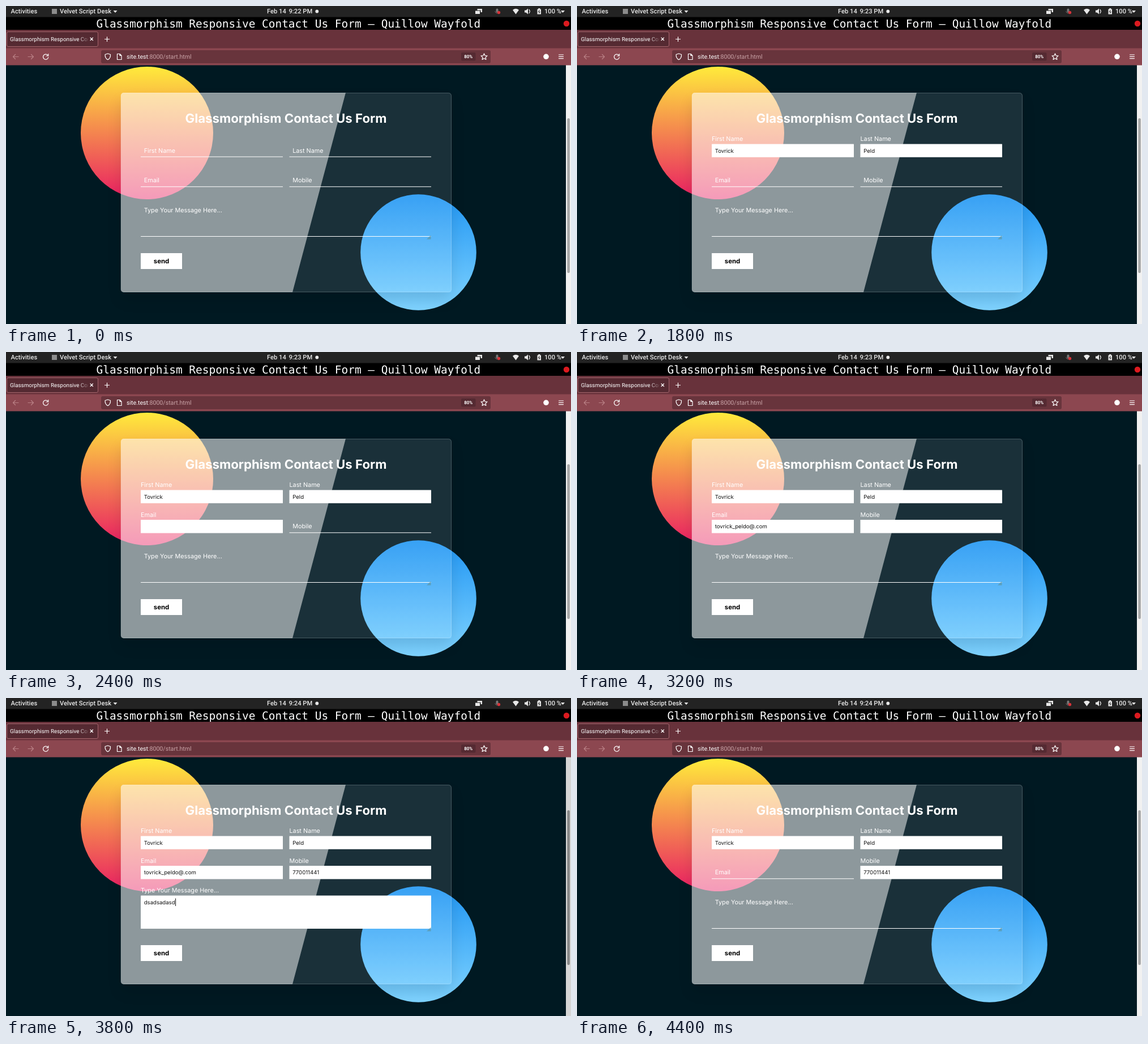
Recreate the animation shown at these times as an HTML page. Size 998 by 561 pixels, loop 4.6 s.

```html
<!DOCTYPE html>
<html lang="en">
<head>
<meta charset="utf-8">
<title>Glassmorphism Contact Us Form</title>
<style>
  html, body { margin: 0; width: 100%; height: 100%; overflow: hidden; background: #001922; }
  svg { display: block; width: 100%; height: 100%; }
  text { fill: #fff; white-space: pre; text-rendering: geometricPrecision; }
  .bar text { font: 500 11.2px Roboto, "Noto Sans", sans-serif; fill: #e9e9e9; }
  .caption { font: 19.45px "DejaVu Sans Mono", monospace; }
  .browser text { font: 10.6px Roboto, "Noto Sans", sans-serif; }
  .browser .tab { font-size: 9.9px; }
  .browser .zoom { font-size: 8px; font-weight: 700; }
  .form text { font: 10.8px Inter, "Open Sans", sans-serif; }
  .form .heading { font-size: 22.2px; font-weight: 700; }
  .form .send { font-size: 11.4px; font-weight: 700; fill: #000; }
  .form .value { font-size: 9.6px; fill: #111; }
  .line { fill: none; stroke: #fff; stroke-width: 1.2; stroke-linecap: round; stroke-linejoin: round; }
  .dim { stroke: #b98085; }
</style>
</head>
<body>
<svg viewBox="0 0 998 561" preserveAspectRatio="none">
  <defs>
    <linearGradient id="sunset" x2="0" y2="1">
      <stop stop-color="#ffeb3b"/><stop offset="1" stop-color="#e91e63"/>
    </linearGradient>
    <linearGradient id="sky" x2="0" y2="1">
      <stop stop-color="#2196f3"/><stop offset="1" stop-color="#7fd3ff"/>
    </linearGradient>
    <linearGradient id="fade" gradientUnits="userSpaceOnUse" x1="128" x2="145" y1="0" y2="0">
      <stop stop-color="#fff"/><stop offset="1" stop-color="#fff" stop-opacity=".15"/>
    </linearGradient>
    <clipPath id="tabClip"><path d="M7 45H145V72H7z"/></clipPath>
    <clipPath id="cardClip"><rect x="203" y="153" width="584" height="352" rx="5"/></clipPath>
    <clipPath id="outside"><path clip-rule="evenodd" d="M0 104H989V561H0zM203 153V505H787V153z"/></clipPath>
    <filter id="soft" x="-20%" y="-20%" width="140%" height="140%"><feGaussianBlur stdDeviation="13"/></filter>
  </defs>

  <!-- page -->
  <rect width="998" height="561" fill="#001922"/>
  <circle cx="249" cy="224" r="117" fill="url(#sunset)"/>
  <circle cx="728.5" cy="434.5" r="102.3" fill="url(#sky)"/>
  <g clip-path="url(#outside)">
    <rect x="203" y="167" width="584" height="352" rx="5" opacity=".1" filter="url(#soft)"/>
  </g>
  <g clip-path="url(#cardClip)" fill="#fff">
    <path d="M203 153H787V505H203z" opacity=".1"/>
    <path d="M203 153H600L506 505H203z" opacity=".5"/>
  </g>
  <rect x="203" y="153.5" width="583.5" height="351" rx="5" fill="none" stroke="#fff" stroke-opacity=".2"/>

  <g class="form">
    <text class="heading" x="494.5" y="206" text-anchor="middle">Glassmorphism Contact Us Form</text>
    <g id="fields"></g>
    <path d="M750.5 404.5V411.5H743z" fill="#5b9aae" opacity=".8"/>
    <rect x="238" y="436" width="73" height="28" fill="#fff"/>
    <text class="send" x="274.5" y="454" text-anchor="middle">send</text>
  </g>

  <rect id="track" x="989" y="104" width="9" height="457"/>
  <rect id="thumb" x="991.3" y="198" width="4.6" height="273" rx="2.3"/>

  <!-- desktop bar -->
  <g class="bar">
    <rect width="998" height="20" fill="#232323"/>
    <text x="8.5" y="13">Activities</text>
    <rect x="81" y="5" width="9" height="9" fill="#8c8c8c"/>
    <text x="95" y="13">Velvet Script Desk</text>
    <text x="461" y="13">Feb 14</text>
    <text id="clock" x="499.5" y="13"></text>
    <text x="951" y="13">100 %</text>
    <g fill="#e9e9e9">
      <path d="M189.5 8H196.5L193 12zM980 8H987L983.500 12z"/>
      <circle cx="549.3" cy="9.500" r="2.9"/>
      <path d="M832.500 5H841V11H838.500V7.500H832.500zM829 8.500H837V14H829z"/>
      <path d="M895 7Q900.500 2.500 906 7L900.500 14.500z"/>
      <path d="M916 7.500H918.500L922 4.500V14.500L918.500 11.500H916z"/>
      <path d="M938.500 5.500H940.300V4H943.300V5.500H945V14.500H938.500z"/>
    </g>
    <path d="M924 6.500Q926.500 9.500 924 12.500" class="line"/>
    <path d="M942.500 7L940.300 10.300H943.300L941.300 13" fill="none" stroke="#232323"/>
    <rect x="865.500" y="4.500" width="4" height="7" rx="2" fill="#777"/>
    <path d="M863.500 9.500Q867.500 16 871.500 9.500" fill="none" stroke="#777"/>
    <circle cx="870.500" cy="11.500" r="2.7" fill="#d8333a"/>
  </g>

  <!-- window -->
  <rect y="19.500" width="998" height="23" />
  <text class="caption" x="159.500" y="38">Glassmorphism Responsive Contact Us Form — Quillow Wayfold</text>
  <circle cx="990" cy="31" r="5.2" fill="#db1a1f"/>
  <g class="browser">
    <rect y="42" width="998" height="33" fill="#68323b"/>
    <rect y="74.500" width="998" height="30" fill="#8c4750"/>
    <rect x="1.500" y="45.500" width="161" height="26" rx="2.500" fill="#552a32" stroke="#a5666d"/>
    <text class="tab" x="7" y="62" clip-path="url(#tabClip)" style="fill:url(#fade)">Glassmorphism Responsive Contact</text>
    <rect x="168" y="78" width="688" height="23" rx="3" fill="#68343c"/>
    <rect x="804" y="82" width="25.500" height="14.500" rx="2" fill="#552a32"/>
    <text x="213" y="93">site.test<tspan fill="#c9a3a7">:8000/start.html</tspan></text>
    <text class="zoom" x="816.700" y="92.300" text-anchor="middle">80%</text>
    <path class="line" d="M149 56L153.500 60.500M153.500 56L149 60.500M174.500 58.500H182.500M178.500 54.500V62.500"/>
    <path class="line dim" d="M22 89.500H12.500M16.500 85.500L12.500 89.500L16.500 93.500M39 89.500H48.500M44.500 85.500L48.500 89.500L44.500 93.500"/>
    <path class="line" d="M73.500 86.500A4.600 4.600 0 1 0 74.700 90.500M74.700 84.500V88H71.200"/>
    <path class="line" d="M179.800 84L184.500 85.500Q185 92 179.800 94.800Q174.600 92 175.100 85.500z"/>
    <path class="line" d="M196.500 84.500H201L204 87.500V94.500H196.500zM201 84.500V87.500H204"/>
    <path class="line" id="star"/>
    <circle cx="954" cy="89.300" r="4.800" fill="#fff"/>
    <path class="line" d="M976.500 86H984.500M976.500 89.300H984.500M976.500 92.600H984.500"/>
  </g>
</svg>
<script>
const LOOP = 4600;
const FIELDS = {
  first:   { x: 238,   y: 243.5, w: 251, h: 23,   label: 'First Name' },
  last:    { x: 500.5, y: 243.5, w: 250.5, h: 23, label: 'Last Name' },
  email:   { x: 238,   y: 296,   w: 251, h: 23.3, label: 'Email' },
  mobile:  { x: 500.5, y: 296,   w: 250.5, h: 23.3, label: 'Mobile' },
  message: { x: 238,   y: 348.5, w: 513, h: 58.5, label: 'Type Your Message Here...' }
};

// A field holding null shows its placeholder; any string shows the filled box.
const STEPS = [
  [0,    { first: null, last: null, email: null, mobile: null, message: null, caret: '', clock: '9:22 PM', hover: false }],
  [200,  { first: '' }],
  [400,  { first: 'T' }],
  [600,  { first: 'To' }],
  [800,  { first: 'Tov' }],
  [1000, { first: 'Tovr', caret: 'first' }],
  [1200, { first: 'Tovrick', caret: '' }],
  [1400, { last: '' }],
  [1600, { last: 'Pe', clock: '9:23 PM' }],
  [1800, { last: 'Peld' }],
  [2200, { email: '', caret: 'email' }],
  [2400, { caret: '' }],
  [2600, { email: 'tovri' }],
  [2800, { email: 'tovrick_pel' }],
  [3000, { email: 'tovrick_peldo@.com', caret: 'email' }],
  [3200, { mobile: '', caret: '' }],
  [3400, { mobile: '770011441' }],
  [3600, { message: 'dsad', clock: '9:24 PM', hover: true }],
  [3800, { message: 'dsadsadasd', caret: 'message' }],
  [4000, { message: null, caret: '', hover: false }],
  [4200, { email: '' }],
  [4400, { email: null }]
];

const byId = id => document.getElementById(id);

function add(parent, tag, attrs) {
  const node = document.createElementNS('http://www.w3.org/2000/svg', tag);
  for (const key in attrs) node.setAttribute(key, attrs[key]);
  return parent.appendChild(node);
}

const starPoints = Array.from({ length: 10 }, (_, i) => {
  const radius = i % 2 ? 2.7 : 5.8, angle = (i / 5 - 0.5) * Math.PI;
  return `${844.5 + radius * Math.cos(angle)} ${89.7 + radius * Math.sin(angle)}`;
});
byId('star').setAttribute('d', `M${starPoints.join('L')}z`);

for (const field of Object.values(FIELDS)) {
  const { x, y, w, h } = field, root = byId('fields');
  add(root, 'rect', { x, y: y + h - 1, width: w, height: 1, fill: '#fff' });
  field.box = add(root, 'rect', { x, y, width: w, height: h, rx: 0.5, fill: '#fff' });
  field.title = add(root, 'text', {});
  field.title.textContent = field.label;
  field.value = add(root, 'text', { class: 'value', x: x + 5.7, y: y + 15.2 });
  field.caret = add(root, 'rect', { y: y + 5, width: 1, height: 13.5, fill: '#111' });
}

function stateAt(time) {
  return Object.assign({}, ...STEPS.filter(step => step[0] <= time).map(step => step[1]));
}

function render(state) {
  for (const [name, field] of Object.entries(FIELDS)) {
    const filled = state[name] !== null;
    field.box.style.display = filled ? '' : 'none';
    field.title.setAttribute('x', field.x + (filled ? 0 : 5.7));
    field.title.setAttribute('y', field.y + (filled ? -5.3 : 15.2));
    field.value.textContent = state[name] || '';
    field.caret.style.display = state.caret === name ? '' : 'none';
    field.caret.setAttribute('x', field.x + 6.2 + field.value.getComputedTextLength());
  }
  byId('clock').textContent = state.clock;
  byId('track').setAttribute('fill', state.hover ? '#d6d6d6' : '#f1f1f1');
  byId('thumb').setAttribute('fill', state.hover ? '#858585' : '#a6a6a6');
}

const start = performance.now();
function tick() {
  render(stateAt((performance.now() - start) % LOOP));
  requestAnimationFrame(tick);
}
tick();
</script>
</body>
</html>
```
